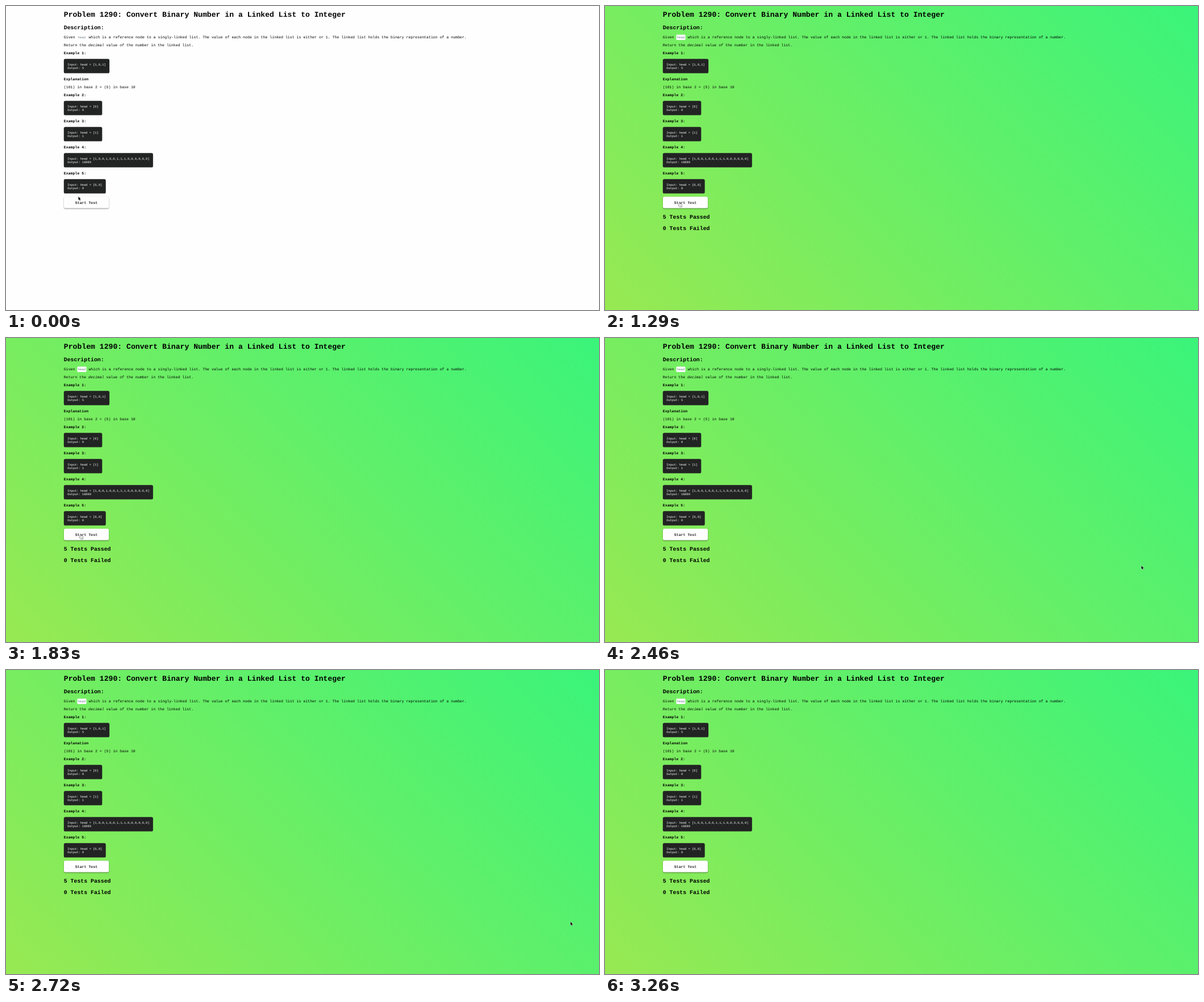
An HTML page with a canvas that plays this animation: 1044 by 536 pixels, repeating every 4110 ms.

```html
<!DOCTYPE html>
<html lang="en">
<head>
<meta charset="utf-8">
<title>Linked list problem</title>
<style>
  html, body { margin: 0; width: 100%; height: 100%; overflow: hidden; background: #fefefe; }
  canvas { display: block; }
</style>
</head>
<body>
<canvas id="stage" width="1044" height="536"></canvas>
<script>
const W = 1044, H = 536, LOOP = 4110, PASSED_AT = 1290;
const EM = 6.562, CODE = EM * 13 / 16, LEFT = 101.8;
const ctx = document.getElementById('stage').getContext('2d', { alpha: false });

// Each pose holds until the next one begins.
const poses = [
  { at: 0, kind: 'arrow', x: 127.5, y: 336 },
  { at: 360, kind: 'hand', x: 128.6, y: 347 },
  { at: 1830, kind: 'hand', x: 128.8, y: 347 },
  { at: 2190, kind: 'arrow', x: 823.6, y: 384.6 },
  { at: 2460, kind: 'arrow', x: 944.4, y: 401.4 },
  { at: 2720, kind: 'arrow', x: 993.8, y: 443.8 },
  { at: 2990, kind: 'arrow', x: 1025.4, y: 529.3 },
  { at: 3260, kind: 'none' }
];

const examples = [
  { n: 1, y: 85.2, input: '[1,0,1]', output: 5 },
  { n: 2, y: 159.2, input: '[0]', output: 0 },
  { n: 3, y: 205.2, input: '[1]', output: 1 },
  { n: 4, y: 251.2, input: '[1,0,0,1,0,0,1,1,1,0,0,0,0,0,0]', output: 18880 },
  { n: 5, y: 297.2, input: '[0,0]', output: 0 }
];

const shapes = {
  arrow: new Path2D('M0 0V6.1L1.4 4.9L2.4 7.2L3.4 6.8L2.4 4.6H4.3Z'),
  hand: new Path2D('M1.9 .5Q2.7 0 3.1 .8L3.7 2.5Q4.3 2 4.9 2.6Q5.6 2.2 6 3Q6.9 2.8 7 3.8V5.6L6.2 7.7H2.9L.5 5Q.4 4 1.3 4.2L2.2 4.8L1.5 1.4Q1.4 .8 1.9 .5Z')
};

// A large font scaled down keeps fractional letter advances.
function text(str, x, y, size = EM, style = '', color = '#000') {
  ctx.save();
  ctx.translate(x, y);
  ctx.scale(size / 100, size / 100);
  ctx.font = `${style} 100px "Courier New", "Liberation Mono", monospace`;
  ctx.textRendering = 'geometricPrecision';
  ctx.fillStyle = color;
  ctx.fillText(str, 0, 0);
  ctx.restore();
}

function box(x, y, w, h, r, color) {
  ctx.fillStyle = color;
  ctx.beginPath();
  ctx.roundRect(x, y, w, h, r);
  ctx.fill();
}

function background(passed) {
  let fill = '#fefefe';
  if (passed) {
    const reach = (W + H) / 4;
    fill = ctx.createLinearGradient(W / 2 - reach, H / 2 + reach, W / 2 + reach, H / 2 - reach);
    fill.addColorStop(0, '#98e952');
    fill.addColorStop(1, '#3af47a');
  }
  ctx.fillStyle = fill;
  ctx.fillRect(0, 0, W, H);
}

function description(passed) {
  text('Problem 1290: Convert Binary Number in a Linked List to Integer', LEFT, 19.4, EM * 2, 'bold');
  text('Description:', LEFT, 40.8, EM * 1.5, 'bold');

  const step = EM * 0.6;
  text('Given', LEFT, 57.2);
  if (passed) box(125.5, 50.6, 16, 9.4, 1.2, '#fefefe');
  text('head', 127.1, 57.1, CODE, '', '#5f7282');
  text('which is a reference node to a singly-linked list. The value of each node in the linked list is either or 1. ' +
       'The linked list holds the binary representation of a number.', 145.4, 57.2);
  text('Return the', LEFT, 71.2);
  text('decimal', LEFT + 11 * step, 71.2, EM, 'italic');
  text('value of the number in the linked list.', LEFT + 19 * step, 71.2);
  text('Explanation', LEFT, 131.2, EM, 'bold');
  text('(101) in base 2 = (5) in base 10', LEFT, 145.2);
}

function example({ n, y, input, output }) {
  const line = `Input: head = ${input}`;
  text(`Example ${n}:`, LEFT, y, EM, 'bold');
  box(LEFT, y + 8.1, line.length * CODE * 0.6 + 2 * EM, 25.2, 2.6, '#222323');
  text(line, LEFT + EM, y + 19.7, CODE, '', '#fff');
  text(`Output: ${output}`, LEFT + EM, y + 25.8, CODE, '', '#fff');
}

function button() {
  ctx.save();
  ctx.shadowColor = 'rgba(0,0,0,.45)';
  ctx.shadowBlur = 2;
  ctx.shadowOffsetY = 1;
  box(102, 336.2, 79, 20.4, 2.5, '#fefefe');
  ctx.restore();
  text('Start Test', 121.8, 348.8, EM, 'bold', 'rgba(0,0,0,.85)');
}

function cursor({ kind, x, y }) {
  const shape = shapes[kind];
  if (!shape) return;
  const isHand = kind === 'hand';
  ctx.save();
  ctx.translate(x, y);
  ctx.lineJoin = 'round';
  ctx.lineWidth = 0.8;
  ctx.strokeStyle = isHand ? '#111' : '#fff';
  ctx.fillStyle = isHand ? '#fff' : '#000';
  ctx.stroke(shape);
  ctx.fill(shape);
  if (isHand) {
    ctx.lineWidth = 0.4;
    ctx.stroke(new Path2D('M3.6 5V6.6M4.6 5V6.6M5.6 5V6.6'));
  }
  ctx.restore();
}

function draw(now) {
  const t = now % LOOP;
  const passed = t >= PASSED_AT;
  background(passed);
  description(passed);
  examples.forEach(example);
  button();
  if (passed) {
    text('5 Tests Passed', LEFT, 374.7, EM * 1.5, 'bold');
    text('0 Tests Failed', LEFT, 394.5, EM * 1.5, 'bold');
  }
  cursor(poses.findLast(pose => t >= pose.at));
}

const start = performance.now();
function tick() {
  draw(performance.now() - start);
  requestAnimationFrame(tick);
}
tick();
</script>
</body>
</html>
```
